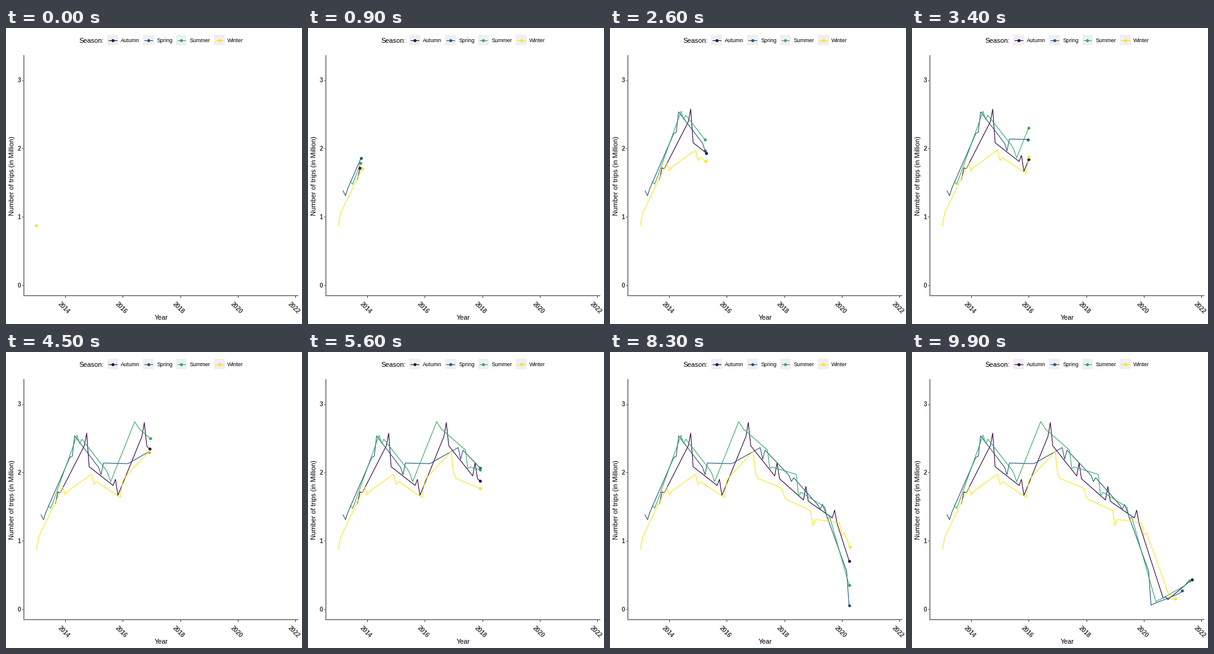
Animation, 480 px wide and 480 px high, one loop 10000 ms. Source, as a matplotlib script:

```python
import numpy as np
import matplotlib.pyplot as plt
from matplotlib.animation import FuncAnimation
from matplotlib.patches import Rectangle

SIZE, FRAMES, INTERVAL = 480, 100, 100
plt.rcParams["font.family"] = "Liberation Sans"

START = np.datetime64("2013-01-01")
SPAN = (np.datetime64("2021-09-01") - START).astype(int)

# name: colour, first month of the season (0 = January), millions of trips per month
SEASONS = {
    "Autumn": ("#300444", 8, [
        1.55, 1.713, 1.704, 2.39, 2.575, 2.083, 1.808, 1.898, 1.663,
        2.526, 2.729, 2.39, 1.948, 2.137, 1.907, 1.595, 1.794, 1.577,
        1.333, 1.446, 1.252, .159, .177, .136, .43]),
    "Spring": ("#25567d", 2, [
        1.379, 1.306, 1.415, 2.219, 2.237, 2.535, 2.074, 1.966, 2.137,
        2.128, 2.142, 2.164, 2.363, 2.192, 2.327, 1.957, 1.866, 1.921,
        1.523, 1.46, 1.532, .556, .055, .073, .213, .231, .267]),
    "Summer": ("#30aa67", 5, [
        1.514, 1.473, 1.568, 2.544, 2.426, 2.485, 2.038, 1.97, 1.862,
        2.743, 2.688, 2.634, 2.327, 2.056, 2.079, 1.97, 1.65, 1.708,
        1.491, 1.324, 1.342, .105, .127, .141, .34, .385, .412]),
    "Winter": ("#fde31c", 11, [
        .873, 1.058, 1.785, 1.668, 1.722, 1.975, 1.821, 1.866, 1.631,
        1.875, 1.93, 2.309, 1.984, 1.911, 1.767, 1.64, 1.6, 1.442,
        1.216, 1.311, 1.261, 1.08, 1.121, .15, .141, .15]),
}


def days(month):
    date = np.datetime64("2013-01") + np.asarray(month)
    return (date.astype("datetime64[D]") - START).astype(int)


def px(day):
    return 49.3 + 0.12782 * day


def py(trips):
    return 416.6 - 110.7 * trips


# At 72 dpi one point is one pixel
fig = plt.figure(figsize=(SIZE / 72, SIZE / 72), dpi=72, facecolor="white")
ax = fig.add_axes([0, 0, 1, 1])
ax.set(xlim=(0, SIZE), ylim=(SIZE, 0))
ax.axis("off")


def rule(xs, ys, color, width):
    ax.plot(xs, ys, color=color, lw=width, solid_capstyle="butt", zorder=1)


def draw_axes():
    tick = dict(fontsize=10, weight="bold", color="#3b3b3b")
    for v in range(4):
        rule([26, 29], [py(v)] * 2, "#232323", 1)
        ax.text(24, py(v) + 4, str(v), ha="right", **tick)
    for year in range(2014, 2023, 2):
        x = px(days((year - 2013) * 12))
        rule([x, x], [434, 437], "#232323", 1)
        ax.text(x - 2.7, 454, str(year), rotation=-45,
                ha="center", va="center", **tick)
    rule([29, 29], [44, 435], "#8e8e8e", 2)
    rule([28, 474], [434, 434], "#8e8e8e", 2)
    ax.text(251.7, 473, "Year", fontsize=11, ha="center")
    ax.text(10, 239.5, "Number of trips (in Million)", fontsize=11,
            rotation=90, ha="center", va="center")


def draw_legend():
    ax.text(118, 24, "Season:", fontsize=11)
    for x, (name, (color, *_)) in zip((164.2, 222.3, 275.8, 337.3), SEASONS.items()):
        ax.add_patch(Rectangle((x, 10.9), 17.3, 17.3, fc="#efefef", ec="none"))
        rule([x + 1.7, x + 15.6], [19.5, 19.5], color, 1.1)
        ax.plot(x + 8.6, 19.5, "o", color=color, ms=4.8, mew=0)
        ax.text(x + 22.1, 23, name, fontsize=8.9)


class Trace:
    """A season's line, revealed up to a moving head."""

    def __init__(self, color, first, trips):
        months = [m for m in range(105) if (m - first) % 12 < 3][:len(trips)]
        day = days(months)
        self.keys = np.round(day * (FRAMES - 1) / SPAN)
        self.pts = np.column_stack([px(day), py(np.array(trips))])
        self.line, = ax.plot([], [], color=color, lw=1.1, zorder=2,
                             solid_joinstyle="round")
        self.dot, = ax.plot([], [], "o", color=color, ms=4.8, mew=0, zorder=3)

    def reveal(self, frame):
        n = np.searchsorted(self.keys, frame, side="right")
        path = self.pts[:n]
        if 0 < n < len(self.pts):
            a, b = self.keys[n - 1:n + 1]
            t = (frame - a) / (b - a)
            head = self.pts[n - 1] * (1 - t) + self.pts[n] * t
            path = np.vstack([path, head])
        self.line.set_data(*path.T)
        self.dot.set_data(*path[-1:].T)
        return self.line, self.dot


draw_axes()
draw_legend()
traces = [Trace(*season) for season in SEASONS.values()]


def update(frame):
    return [artist for trace in traces for artist in trace.reveal(frame)]


anim = FuncAnimation(fig, update, frames=FRAMES, interval=INTERVAL,
                     repeat=True, repeat_delay=0)
plt.show()
```
